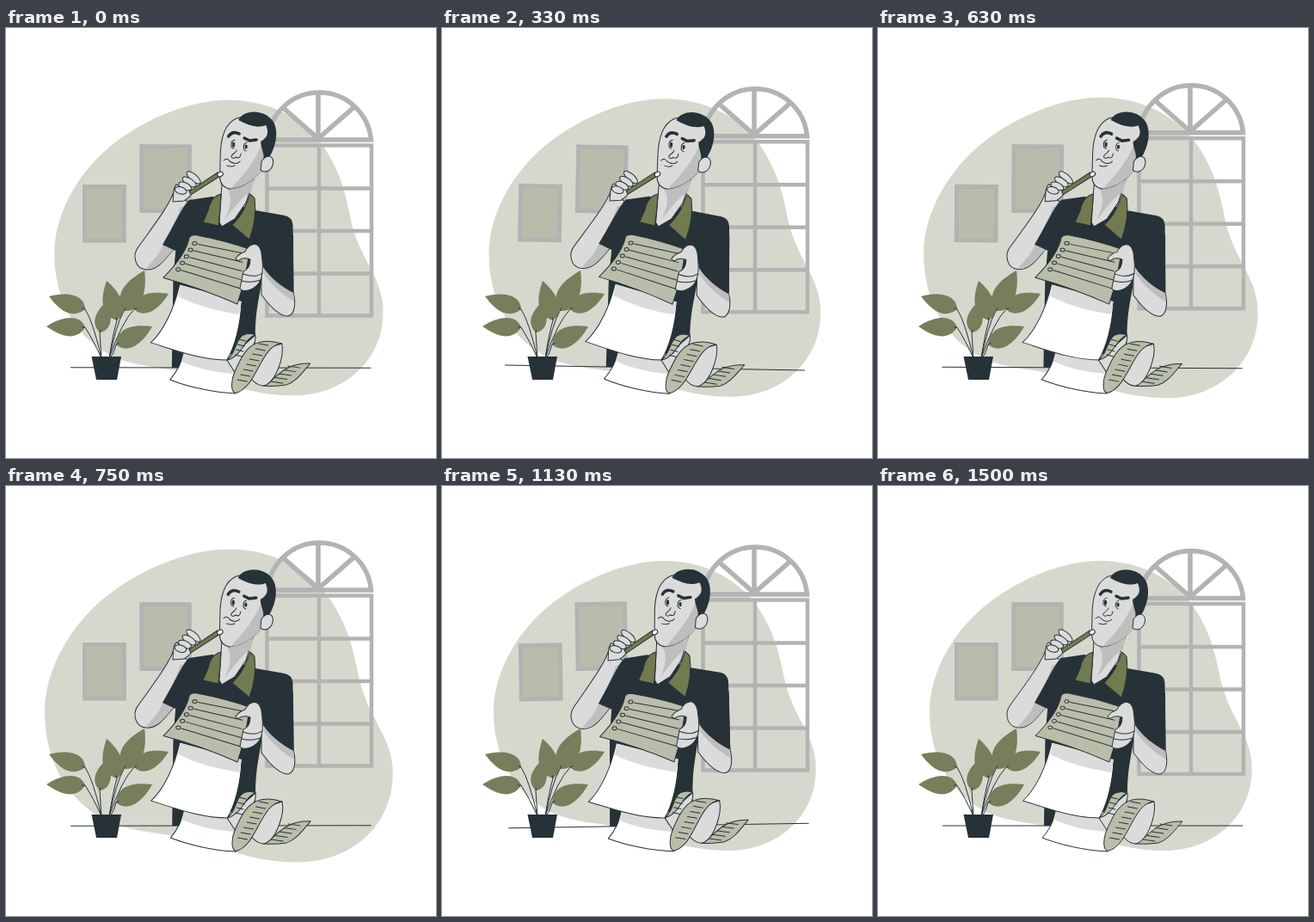
An HTML page that plays this animation: 500 px wide and 500 px high, repeating every 1540 ms.

```html
<!DOCTYPE html>
<html lang="en">
<head>
<meta charset="utf-8">
<title>Thinking over a long list</title>
<style>
  html, body { margin: 0; width: 100%; height: 100%; overflow: hidden; background: #fff; }
  svg { display: block; width: 100%; height: 100%; }
  .line { fill: none; stroke: #263238; stroke-linecap: round; stroke-linejoin: round; }
  .brow { stroke-width: 3.5; }
  .ink { stroke: #263238; stroke-linejoin: round; }
  .dark { fill: #263238; }
  .skin { fill: #dbdbdb; }
  .shade { fill: #bebebe; }
  .olive { fill: #727a50; }
  .note { fill: #b9bda9; }
  .white { fill: #fff; }
  .frame { fill: none; stroke: #b3b3b3; stroke-width: 5; }
</style>
</head>
<body>
<svg viewBox="0 0 500 500">
  <path id="blob" fill="#d6d8cd" d="M60 262C60 215 90 165 130 135C165 108 215 87 258 87C305 87 345 108 368 142C385 168 391 190 396 214C402 247 412 262 423 284C432 302 436 318 434.5 335C432 385 390 424 333 424C295 424 270 415 235 404C200 393 175 394 145 386C95 372 60 325 60 262Z"/>

  <g id="window" class="frame">
    <path stroke-width="5.5" d="M304 130.500A60.500 60.500 0 0 1 424.500 130.500ZM363 75V130M322 93L363 129L404 93"/>
    <path stroke-width="4.500" d="M303.500 137H425V335H303.500ZM364 137V335M303 187H425M303 236.500H425M303 286H425"/>
  </g>

  <g id="pictures" class="frame">
    <path fill="#b9bcab" d="M157.800 137.800H213.300V212.500H157.800ZM91.500 184.500H137.300V247H91.500Z"/>
  </g>

  <g id="person">
    <path class="line" d="M75.500 395H424"/>

    <!-- torso -->
    <path class="dark" d="M213 200L240 196L290 212L324 218Q333 220 333.500 229L334.500 308L298 288C296 310 290 325 290 358L289 395H193L194.500 290L198 250Z"/>

    <!-- raised arm -->
    <path class="skin ink" d="M195 190C191 205 170 232 153 256C147 265 150 280 163 281C178 282 186 267 198 254L212 203Z"/>
    <path class="shade" d="M163 280C178 281 186 267 198 254L212 207L203 208C196 228 186 246 181 255C176 268 166 274 163 280Z"/>
    <path class="dark" d="M213 200C205 207 198 225 182 252L197 259L215 235Z"/>

    <!-- lower arm -->
    <path class="skin ink" d="M297 272L334 307C337 317 337 333 328 335C320 335 310 328 297 310Z"/>
    <path class="shade" d="M300 274L334 307L335 318C325 312 311 302 300 286Z"/>
    <path class="dark" d="M299 240H334L334.500 308C320 301 307 290 299 278Z"/>

    <!-- neck and collar -->
    <path class="skin ink" d="M251 180L248 226L251 231L266 222L279 203L289 172Z"/>
    <path class="shade" d="M257 187Q276 184 289 171L285 190C274 196 264 211 254 223C262 208 263 196 257 187Z"/>
    <path class="olive ink" d="M250 193Q238 196 235 212L229 226L247 230L249 210Z"/>
    <path class="olive ink" d="M284 193L289 198Q292 222 283 246L263 229Q275 217 280 203Z"/>

    <!-- head -->
    <path class="skin ink" d="M268 105C254 111 249 130 249 151L248.500 173Q249 185 260 187C276 186 291 174 299 163L311 130Q310 108 290 100Z"/>
    <path class="shade" d="M300 127C293 150 280 167 261 187C278 185 291 174 299 164L309 145L310 126Z"/>
    <path class="dark" d="M270 107C275 95 299 93 310 108C317 118 315 138 304 153L299 153C301 147 296 139 296 132C307 126 304 118 302 113C292 117 281 113 270 107Z"/>
    <path class="skin ink" d="M297 155C302 147 311 147 310.500 157C309 167 300 169 296 165Z"/>

    <!-- face -->
    <path class="line brow" d="M258.500 126Q263 119 271 123M277 128L283 131L291 130"/>
    <path class="line" d="M266 130C260 131 261 140 265 140M280 133C275 134 275 142 279 143M268 142C267 146 261 147 262 150Q264 153 267 150Q272 153 273 146M253 154Q257 150 260 155Q267 160 272 155M257 160Q262 162 266 160"/>
    <path class="line" stroke-width="3" d="M264.500 134V137M279 137V139"/>

    <!-- pencil and hand -->
    <path class="skin ink" d="M194 202C195 190 194 187 198 182L217 190Q215 196 207 201Z"/>
    <path class="olive ink" d="M213 190L246 168L249 172L215 194Z"/>
    <ellipse class="white ink" cx="249" cy="170" rx="3.400" ry="2.600" transform="rotate(-32 249 170)"/>
    <g id="fingers" class="skin ink"></g>

    <!-- folded end of the paper -->
    <path class="white ink" d="M207 376C204 392 198 401 191 409C211 417 241 424 267 425L288 380Z"/>
    <path class="skin" d="M207 377L204 388Q232 400 265 402L272 386Z"/>
    <path class="note ink" d="M299 416C315 409 321 389 354 390C345 400 338 411 326 415Q313 417 299 416Z"/>
    <path class="skin ink" d="M321 367C324 382 314 412 300 416Q291 416 284 406L298 374Z"/>
    <path class="skin ink" d="M290 357C292 370 280 378 266 400L257 386Z"/>
    <path class="note ink" d="M267 424.500C261 423 262 409 266 400C276 378 285 356 321 367C296 368 292 419 267 424.500Z"/>
    <path class="note ink" d="M257 386C268 378 267 361 276 357Q283 354 290 357C276 362 275 382 257 386Z"/>
    <path id="folds" class="line"/>

    <!-- white part of the paper -->
    <path class="white ink" d="M202 298C196 325 184 352 168.500 366C195 374 226 386 257 386C266 372 273 345 274 318Z"/>
    <path class="skin" d="M203 299L200 312Q230 327 271 333L274 318Z"/>

    <!-- list -->
    <path class="note ink" d="M183 290.500C198 275 210 260 213 244Q215 240 222 241Q254 247 283 257Q280 288 269 321Q226 302 183 290.500Z"/>
    <g id="items" class="line"></g>

    <!-- holding hand -->
    <path class="skin ink" d="M267 268Q270 263 278 260C283 250 294 247 297 261C299 276 300 291 292 299C285 306 275 307 272 303L276 283Q284 280 284 269Q276 266 271 270Q268 271 267 268Z"/>
    <path class="line" d="M276 286Q289 291 298 285M274 294Q285 297 296 293"/>
  </g>

  <g id="leaves"></g>
  <path class="dark" d="M99.500 382H134L129 409H105Z"/>
</svg>

<script>
const el = id => document.getElementById(id);
const repeat = (count, draw) => Array.from({ length: count }, (_, i) => draw(i)).join('');

// A pointed leaf from tip to base, with a stem running down into the pot
function leaf(tx, ty, bx, by) {
  const dx = bx - tx, dy = by - ty, potX = bx < 115 ? 111 : 120;
  const at = (along, side) => `${tx + dx * along - dy * side} ${ty + dy * along + dx * side}`;
  return `<path fill="#777e5c" d="M${tx} ${ty}C${at(.3, .2)} ${at(.75, .42)} ${bx} ${by}
    C${at(.85, -.38)} ${at(.35, -.25)} ${tx} ${ty}"/>
    <path class="line" d="M${at(.93, 0)}L${bx} ${by}Q${(bx + potX) / 2} ${by + 15} ${potX} 384"/>`;
}
el('leaves').innerHTML =
  leaf(50, 312, 92, 327) + leaf(47, 347, 92, 348) + leaf(118, 317, 109, 354) +
  leaf(117, 294, 129, 340) + leaf(161, 282, 137, 329) + leaf(189, 309, 149, 327) +
  leaf(170, 347, 128, 368);

el('items').innerHTML = repeat(5, i => {
  const x = 219.5 - 4.8 * i, y = 250.5 + 7.6 * i;
  return `<ellipse cx="${x}" cy="${y}" rx="2.6" ry="2"/>
    <path d="M${x + 4} ${y + 1}L${276 - i} ${262 + 10.2 * i}"/>`;
});

el('fingers').innerHTML = repeat(4, i =>
  `<ellipse rx="${10 - i}" ry="4" transform="translate(${218 - 5 * i} ${174 + 5 * i}) rotate(${40 - 8 * i})"/>`);

const ruled = (count, x, y, dx, dy, width) =>
  repeat(count, i => `M${x + i * dx} ${y + i * dy}l${width} 2`);
el('folds').setAttribute('d',
  ruled(4, 271, 362, -1.5, 6, 8) + ruled(8, 294, 367, -3.5, 6, 11) + ruled(5, 328, 393, -5, 4.5, 14));

const LOOP = 1540, STEPS = 37, CYCLE = 1500, LEAD = 30;
const bump = (t, peak, rise, fall) =>
  Math.max(0, 1 - (t < peak ? (peak - t) / rise : (t - peak) / fall));

function draw() {
  // The motion advances in 24 even steps per second
  const now = performance.now() % LOOP;
  const step = Math.min(STEPS - 1, Math.floor((now + 6) / LOOP * STEPS));
  const t = Math.min(CYCLE, step * 1000 / 24 + LEAD);
  const phase = t / CYCLE * 2 * Math.PI;

  const scale = 1 + .1 * (bump(t, 150, 150, 300) + bump(t, 750, 150, 150));
  const sway = Math.asin(Math.sin(phase)) * 2 / Math.PI;
  const lift = -10 * Math.acos(Math.cos(phase)) / Math.PI;

  const move = (id, value) => el(id).setAttribute('transform', value);
  move('blob', `translate(247.5 255.5) scale(${scale}) translate(-247.5 -255.5)`);
  move('window', `translate(0 ${lift})`);
  move('pictures', `rotate(${sway} 152 192)`);
  move('person', `rotate(${sway} 250 261)`);
  requestAnimationFrame(draw);
}
draw();
</script>
</body>
</html>
```
